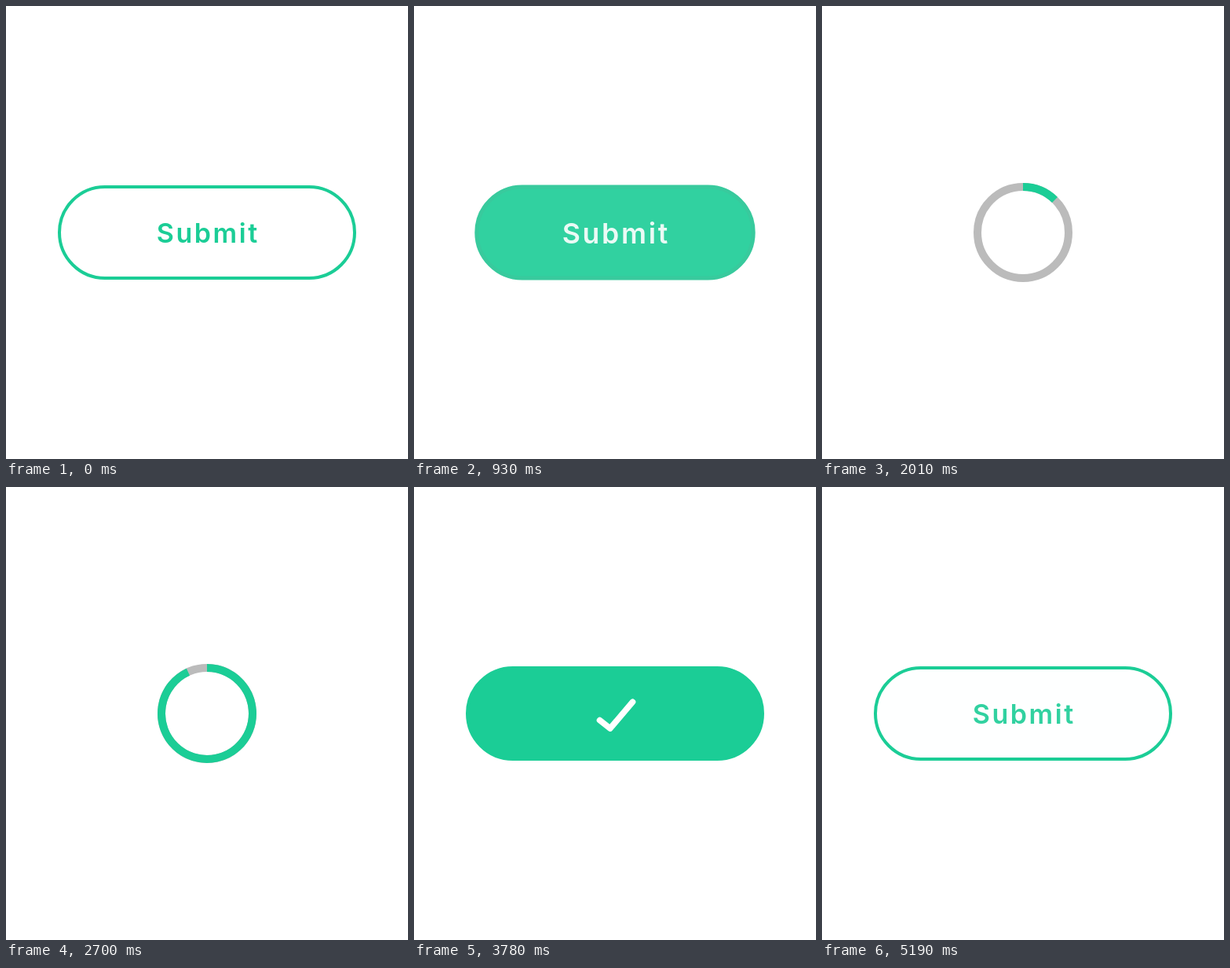
Recreate the animation shown at these times as an HTML page. Size 512 by 576 pixels, loop 5220 ms.

```html
<!DOCTYPE html>
<html lang="en">
<head>
<meta charset="utf-8">
<title>Submit button</title>
<style>
  html, body { margin: 0; width: 100%; height: 100%; overflow: hidden; background: #fff; }
  svg { display: block; width: 100%; height: 100%; }
  text {
    font: 600 34px Inter, "Open Sans", sans-serif;
    letter-spacing: 2.6px;
    text-anchor: middle;
  }
</style>
</head>
<body>
<svg viewBox="0 0 512 576">
  <rect id="pill" y="230" height="116" rx="58"/>
  <path id="arc" fill="none" stroke="#1bcd96" stroke-width="10"/>
  <text id="label" x="1.3" y="13">Submit</text>
  <path id="check" d="M236.5 296.5 L249.8 307 L278.5 273.3" fill="none" stroke="#fff"
        stroke-width="7.6" stroke-linecap="round" stroke-linejoin="round"/>
</svg>
<script>
const LOOP = 5220, TICK = 30;
const GREEN = [27, 205, 150], GRAY = [187, 187, 187], WHITE = [255, 255, 255];
const [pill, arc, label, check] = ['pill', 'arc', 'label', 'check'].map(id => document.getElementById(id));

const span = (t, from, to) => Math.min(1, Math.max(0, (t - from) / (to - from)));
const mix = (a, b, p) => a + (b - a) * p;
const blend = (a, b, p) => `rgb(${a.map((v, i) => Math.round(mix(v, b[i], p)))})`;
const inOut = (p, k) => p < 0.5 ? 0.5 * (2 * p) ** k : 1 - 0.5 * (2 - 2 * p) ** k;

// Cubic bezier easing with handles (x1, 0) and (x2, 1), solved by bisection
function bezier(p, x1, x2) {
  let lo = 0, hi = 1;
  for (let i = 0; i < 30; i++) {
    const s = (lo + hi) / 2, r = 1 - s;
    if (3 * s * r * r * x1 + 3 * s * s * r * x2 + s ** 3 < p) lo = s; else hi = s;
  }
  return lo * lo * (3 - 2 * lo);
}

function set(el, attrs) {
  for (const name in attrs) el.setAttribute(name, attrs[name]);
}

function arcPath(turn) {
  if (turn < 0.0003) return '';
  const a = Math.min(turn, 0.9999) * 2 * Math.PI;
  const x = 256 + 58 * Math.sin(a), y = 288 - 58 * Math.cos(a);
  return `M256 230 A58 58 0 ${turn > 0.5 ? 1 : 0} 1 ${x} ${y}`;
}

function render(t) {
  const hover = inOut(span(t, 300, 600), 2.1);
  const shrink = span(t, 750, 1290);
  const grow = span(t, 3420, 3780);
  const reset = span(t, 4740, 5220);
  const opening = t >= 3420;

  const round = inOut(shrink, 4.2) - inOut(grow, 2.7);
  const thick = inOut(shrink, 2.5) - inOut(grow, 1.3);
  const fill = hover - inOut(shrink, 4) + inOut(grow, 1.86) - inOut(reset, 2.3);
  const width = mix(376, 116, round);
  set(pill, {
    x: 256 - width / 2,
    width,
    fill: blend(GREEN, GREEN, 0),
    'fill-opacity': Math.max(0, fill),
    stroke: opening ? blend(GREEN, GREEN, 0) : blend(GREEN, GRAY, inOut(shrink, 2.5)),
    'stroke-width': mix(4, 10, thick)
  });

  const loading = t > 1300 && !opening;
  arc.setAttribute('d', loading ? arcPath(bezier(span(t, 1212, 3411), 0.856, 0.082)) : '');

  const back = t >= 4740;
  const scale = back ? 1 : mix(1, 1.045, hover);
  set(label, {
    transform: `translate(256 288) scale(${scale})`,
    fill: back ? blend(GREEN, GREEN, 0) : blend(GREEN, WHITE, Math.min(1, hover * 1.08)),
    opacity: back ? mix(0, 0.96, reset) : 1 - inOut(shrink, 4)
  });

  check.setAttribute('opacity', inOut(grow, 2) * (1 - inOut(reset, 2.3)));
}

const start = performance.now();
function frame() {
  const t = (performance.now() - start) % LOOP;
  render(Math.floor(t / TICK) * TICK);
  requestAnimationFrame(frame);
}
render(0);
requestAnimationFrame(frame);
</script>
</body>
</html>
```
